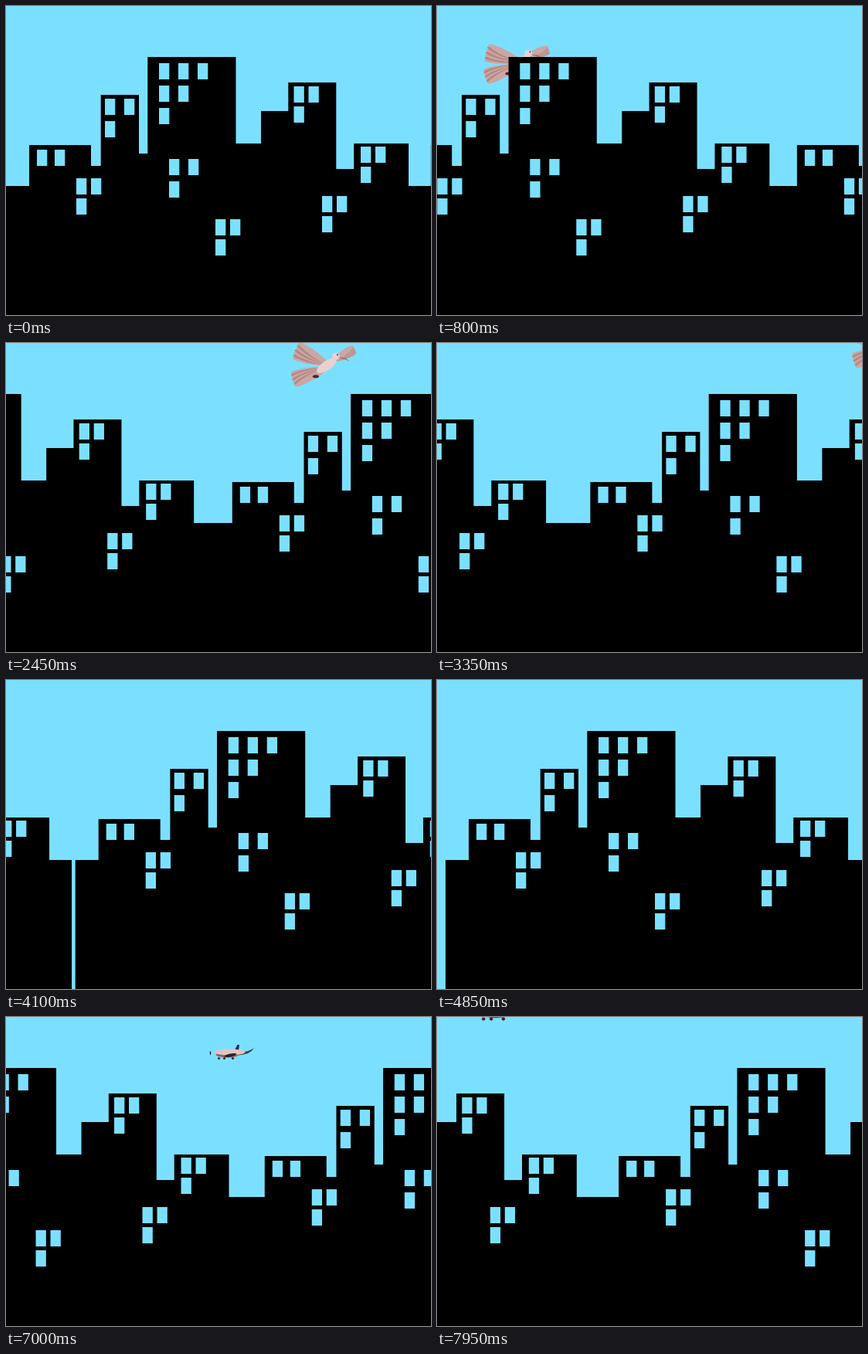
Write an HTML page with a canvas that moves like this. It is 550 px wide and 400 px high and loops after 8000 ms.

```html
<!DOCTYPE html>
<html lang="en">
<head>
<meta charset="utf-8">
<title>City skyline</title>
<style>
  html, body { margin: 0; width: 100%; height: 100%; overflow: hidden; background: #000; }
  canvas { display: block; width: 550px; height: 400px; }
</style>
</head>
<body>
<canvas id="stage" width="550" height="400"></canvas>
<script>
const ctx = document.getElementById('stage').getContext('2d');
const SKY = '#7be0ff';
const STEP_MS = 50, STEPS = 160, CITY_STEPS = 99;
const skyline = new Path2D(`M0 400 V233 H30 V180 H110 V207 H122.7 V115 H172 V191 H183.3 V66
  H297.5 V178 H330 V136 H365.3 V99 H427.3 V211 H450.2 V178 H521 V233 H550 V400 Z`);

function at(x, y, scale, draw) {
  ctx.save();
  ctx.translate(x, y);
  ctx.scale(scale, scale);
  draw();
  ctx.restore();
}

function oval(color, x, y, rx, ry, angle = 0) {
  ctx.fillStyle = color;
  ctx.beginPath();
  ctx.ellipse(x, y, rx, ry, angle, 0, Math.PI * 2);
  ctx.fill();
}

function outline(color, path) {
  ctx.fillStyle = color;
  ctx.fill(new Path2D(path));
}

// Each row of lit windows is one shorter than the row above.
function windows(x, y, gap = 19, columns = 2, rows = columns) {
  for (let row = 0; row < rows; row++) {
    for (let col = 0; col < columns - row; col++) {
      ctx.fillRect(x + col * gap, y + Math.round(row * (gap / 2 + 16.4)), 13.3, 21);
    }
  }
}

function city() {
  ctx.fillStyle = '#000';
  ctx.fill(skyline);
  ctx.fillStyle = SKY;
  windows(40, 186, 23, 2, 1);
  windows(128, 120, 25);
  windows(198, 74, 25, 3);
  windows(211, 198, 25);
  windows(91, 223);
  windows(271, 276);
  windows(372.5, 104);
  windows(409, 246);
  windows(459, 182);
}

function feathers(x, y, from, to, length) {
  const count = 7;
  for (let i = 0; i < count; i++) {
    const angle = (from + (to - from) * i / (count - 1)) * Math.PI / 180;
    const reach = length / 2;
    oval(i % 2 ? '#b48782' : '#cba6a2',
      x + Math.cos(angle) * reach, y + Math.sin(angle) * reach, reach, 4, angle);
  }
}

function bird(flap) {
  feathers(7, 0, 187 + flap, 213 + flap, 47);
  feathers(5, 6, 173, 151, 47);
  oval('#5a2028', -9, 16, 4, 2);
  feathers(14, -5, -16 - flap, -33 - flap, 31);
  oval('#ead1d0', 5, 2, 15, 6, -0.6);
  oval('#ead1d0', 17, -10, 5, 4.5);
  outline('#8d716f', 'M19 -9 L29 -8 L35 -3 L29 -6 Z');
  oval('#4b3038', 19, -12, 1, 1);
}

function plane() {
  oval('#252238', -28, 1, 0.8, 2.5);
  outline('#17234d', 'M2 0 L7 -9.5 H9.5 L8 1 Z');
  outline('#443a4b', 'M8 0 Q22 0 28.5 -5.5 Q24 3 8 4 Z');
  oval('#8d6663', -6, 3, 15, 4);
  oval('#e5c4bd', -3, 0, 20, 4);
  oval('#262030', -2, 4, 8, 2, -0.2);
  for (const x of [-17, -10, 1]) oval('#4a1d2a', x, 8, 1.6, 1.5);
}

function render(step) {
  const k = step % CITY_STEPS;
  ctx.fillStyle = SKY;
  ctx.fillRect(0, 0, 550, 400);

  if (step < CITY_STEPS) {
    const d = k - 32;
    const flap = 6 * Math.sin(d * Math.PI * 2 / 7);
    at(251 + 9.35 * d, 50 - 1.34 * d, 1, () => bird(flap));
  } else {
    const d = k - 41;
    at(292.5 - 10.95 * d, 45.5 - 2.857 * d, 1 + 0.0224 * d, plane);
  }

  // The two skyline halves drift at slightly different speeds.
  at(-5.67 * k, 0, 1, city);
  at(519.8 - 5.245 * k, 0, 1, city);
}

const start = performance.now();
function tick() {
  render(Math.floor((performance.now() - start) / STEP_MS) % STEPS);
  requestAnimationFrame(tick);
}
tick();
</script>
</body>
</html>
```
